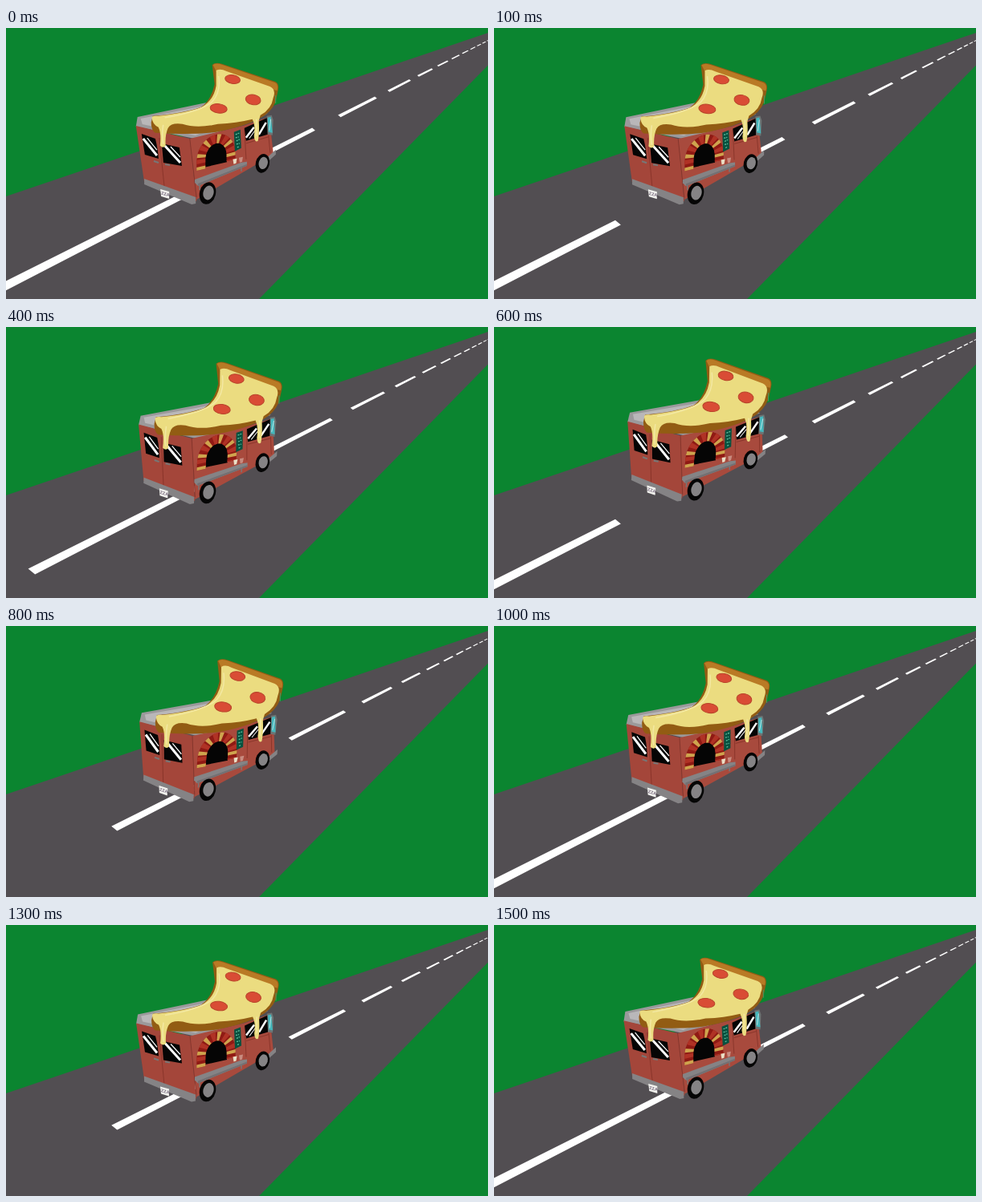
Write an HTML page that moves like this. It is 600 px wide and 338 px high and loops after 1.6 s.

```html
<!DOCTYPE html>
<html lang="en">
<head>
<meta charset="utf-8">
<title>Pizza truck</title>
<style>
  html, body { margin: 0; width: 100%; height: 100%; overflow: hidden; background: #0b8530; }
  svg { display: block; width: 100vw; height: 100vh; }
  .black { fill: #050505; }
  .glare { stroke: #fff; fill: none; }
  .gray { fill: #858385; }
  .seam { stroke: #843127; stroke-width: .8; fill: none; }
  .pepperoni { fill: #d94c35; stroke: #b8442a; stroke-width: 1; }
</style>
</head>
<body>
<svg viewBox="0 0 600 338" preserveAspectRatio="none">
  <rect width="600" height="338" fill="#0b8530"/>
  <path fill="#524e52" d="M0 210L600 6V46.5L315 338H0Z"/>
  <path id="dashes" fill="#fff"/>

  <g id="body">
    <!-- roof and walls -->
    <path fill="#9b999b" d="M164 111L250 93L326 107L240 139L162 123Z"/>
    <path fill="#b9b7b9" d="M168 113L247 97L290 112L236 134L170 120Z"/>
    <path fill="#a4463a" d="M162 122L229 138L237 216L172 192Z"/>
    <path fill="#a84a3d" d="M229 138L296 122L328 111L333 158L237 214Z"/>
    <path class="seam" d="M191 137L197 198M229 138L237 211M297 126L299 164M327 134L329 156M299 144L327 136"/>

    <!-- rear windows -->
    <path class="black" d="M169 132L186 138Q189 149 190 163L173 158Z"/>
    <path class="black" d="M194 144L216 149L219 172L196 168Z"/>
    <path class="glare" stroke-width="3" d="M171 138L188 159M198 147L217 168"/>
    <path class="glare" stroke-width="1.2" d="M176 137L188 152M205 148L217 161"/>
    <path stroke="#777" stroke-width="2" d="M184 166L190 168M198 170L204 171"/>

    <!-- oven -->
    <g transform="matrix(1 -.23 0 1 261.5 161.5)" fill="none" stroke-width="11">
      <path class="black" d="M-13.5 9V0A13.5 18 0 0 1 13.5 0V9Z"/>
      <path stroke="#8f1a14" d="M-18.7 11V0A18.7 23 0 0 1 18.7 0V8"/>
      <path stroke="#cfa44e" stroke-dasharray="4 11" d="M-18.7 11V0A18.7 23 0 0 1 18.7 0V8"/>
      <path stroke="#b03225" stroke-dasharray="5 10" stroke-dashoffset="-8" d="M-18.7 11V0A18.7 23 0 0 1 18.7 0V8"/>
    </g>

    <!-- menu board -->
    <path fill="#08513f" d="M284 130L292 127L293 150L285 154Z"/>
    <path stroke="#63c3a3" stroke-width="1.2" stroke-dasharray="2 1" d="M286 133L291 131M286 137L290 136M287 141L291 139M287 145L291 144M288 149L290 148"/>

    <!-- cab -->
    <path class="black" d="M297 125L326 112V133L299 141Z"/>
    <path class="glare" stroke-width="2.5" d="M299 137L309 124M315 133L324 118"/>
    <path class="glare" stroke-width="1" d="M303 138L311 127"/>
    <path stroke="#a84a3d" stroke-width="4" d="M312.5 115V138"/>
    <path fill="#6d7474" d="M325 110L331 109L333 115L332 134L326 133Z"/>
    <path fill="#43b7bc" d="M326 112L330 111L332 131L327 130Z"/>
    <path stroke="#b8e4e4" d="M328 128L330 114"/>
    <path class="gray" d="M326 161L336 152V158L327 166Z"/>

    <!-- counter and cups -->
    <path class="gray" d="M235 189L293 168L300 167V172L239 197L235 193Z"/>
    <path fill="#737073" d="M239 194L300 170V172L239 197Z"/>
    <path stroke="#777" stroke-width="1.5" d="M241 196V202M293 173V179"/>
    <path fill="#eadfc6" d="M282.5 164L287.5 163L286.5 169L283.5 170Z"/>
    <path fill="#c88c80" d="M290 162L295 161L294 167L291 168Z"/>

    <!-- rear bumper and plate -->
    <path class="gray" d="M172 188L236 211V219L231 220L172 195Z"/>
    <path fill="#f2f2ee" d="M192 201L203 204V213L193 210Z"/>
    <text font-family="Liberation Sans, sans-serif" font-size="5.5" font-weight="700" fill="#75677c" transform="matrix(1 .27 0 1 193 207.5)">ZZA</text>
  </g>

  <g id="wheels">
    <g id="wheel">
      <ellipse class="black" cx="251" cy="206" rx="10" ry="14" transform="rotate(14 251 206)"/>
      <ellipse class="gray" cx="252" cy="205.5" rx="6.5" ry="9" transform="rotate(14 252 205.5)"/>
    </g>
    <use href="#wheel" transform="translate(104.5 -7.5) scale(.856)"/>
  </g>

  <g id="pizza">
    <path fill="#925c13" d="M257 46Q261 42 270 45L336 67Q341 70 339 78L336 92Q330 106 316 113Q298 123 262 130Q230 134 186 131Q181 128 181 118L183 110Q220 107 243 99Q256 90 260 70Z"/>
    <path fill="#b97a25" d="M258 46Q262 43 270 46L335 68Q340 70 338 78L333 77L262 54Z"/>
    <path fill="#ebdc80" d="M262 53Q267 50 275 54L329 73Q337 77 333 87Q331 101 317 109L315 116Q316 132 314 141Q310 144 309 135Q311 122 307 114Q287 119 264 120Q238 126 220 120Q206 118 202 125Q198 134 199 147Q196 151 192 147Q194 132 190 124Q183 121 182 113Q181 109 190 110Q226 106 244 99Q259 90 262 72Z"/>
    <path fill="none" stroke="#f3e8a2" stroke-width="1.5" d="M265 60Q268 80 257 92Q244 104 198 112M196 121Q194 133 196 145M312 114V135"/>
    <path fill="none" stroke="#3f9a62" d="M336 84V94"/>
    <g class="pepperoni">
      <ellipse cx="282.5" cy="64" rx="9.5" ry="5.3" transform="rotate(10 282.5 64)"/>
      <ellipse cx="308" cy="89.5" rx="9.5" ry="6.3" transform="rotate(10 308 89.5)"/>
      <ellipse cx="265" cy="100.5" rx="10.5" ry="5.7" transform="rotate(7 265 100.5)"/>
    </g>
  </g>
</svg>
<script>
  const LOOP = 1600, STEP = 100, CYCLE = 500;
  const VX = 660, VY = -15;                // vanishing point
  const GAP = 0.00136, LEN = 0.00093;      // dash spacing and length in inverse distance
  const FIRST = 0.00365, LEAD = 0.00004;   // far end of dash 0; head start of the oldest dashes
  const BOB = [[0, 0], [300, .7], [500, 0], [600, -3.3], [800, -1.7],
               [1000, .7], [1300, .5], [1500, -3], [1600, 0]];
  const $ = id => document.getElementById(id);

  function lerpKeys(keys, t) {
    const i = keys.findIndex(k => k[0] > t);
    const [t0, a] = keys[i - 1], [t1, b] = keys[i];
    return a + (b - a) * (t - t0) / (t1 - t0);
  }

  // side: -1 upper edge, 1 lower edge
  function corner(u, side) {
    const d = (1 - side * 0.0068) / Math.max(u, 0.0014);
    return `${(VX - d).toFixed(2)} ${(VY + d * (0.5096 + side * 0.009)).toFixed(2)}`;
  }

  function dashPath(t) {
    const travel = t / CYCLE, passed = Math.floor(travel);
    let path = '';
    for (let n = passed - 1; n < passed + 13; n++) {
      const far = FIRST + (n - travel) * GAP - (n <= 0 ? LEAD : 0), near = far - LEN;
      path += `M${corner(near, -1)}L${corner(far, -1)}L${corner(far, 1)}L${corner(near, 1)}Z`;
    }
    return path;
  }

  function place(id, ...m) {
    $(id).setAttribute('transform', `matrix(${m.join(' ')})`);
  }

  function draw() {
    const t = Math.floor(performance.now() % LOOP / STEP) * STEP;
    const sway = 2.5 + 3.2 * Math.cos(2 * Math.PI * (t - 680) / LOOP);
    const bob = lerpKeys(BOB, t);
    const lean = sway / 75, roll = sway * 0.005;
    const tilt = sway * 0.0035, stretch = sway * 0.01;
    $('dashes').setAttribute('d', dashPath(t));
    place('body', 1, roll, -lean, 1, lean * 180, bob - roll * 200);
    place('wheels', 1, 0, 0, 1, 0, bob);
    place('pizza', 1, 0, -tilt, 1 + stretch, sway + tilt * 88, bob - stretch * 60);
    requestAnimationFrame(draw);
  }
  draw();
</script>
</body>
</html>
```
